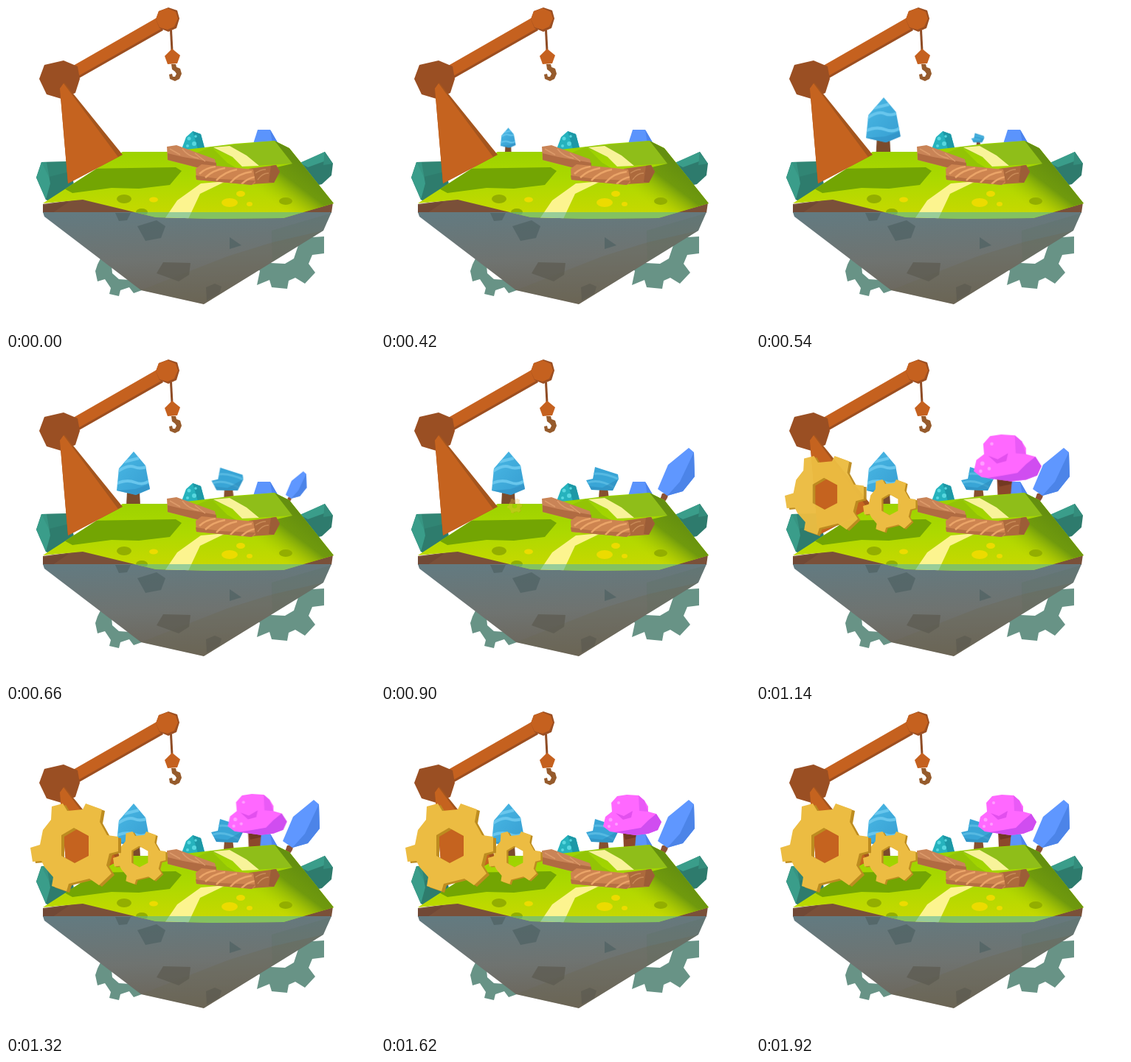
Animation of 500x440 px, one loop 1.98 s. Source, as an HTML page:

```html
<!DOCTYPE html>
<html lang="en">
<head>
<meta charset="utf-8">
<title>Floating island</title>
<style>
html, body { margin: 0; width: 100%; height: 100%; overflow: hidden; background: #fff; }
svg { display: block; width: 100vw; height: 100vh; }
.pop { animation: 1980ms step-end infinite; }
#pine { transform-origin: 172px 198px; animation-name: pine; }
#bent { transform-origin: 301px 189px; animation-name: bent; }
#leaf { transform-origin: 384px 196px; animation-name: leaf; }
#pink { transform-origin: 338px 185px; animation-name: pink; }
#cog { transform-origin: 181px 201px; animation-name: cog; }
#wheel { transform-origin: 93px 187px; animation-name: wheel; }
/* one 60 ms step is 3.03% of the loop */
@keyframes pine {
  0% { transform: scale(0); }
  21.2% { transform: scale(.46); }
  24.2% { transform: scale(.8); }
  27.2% { transform: scale(1.04); }
  30.3% { transform: scale(1.06); }
  33.3%, 100% { transform: none; }
}
@keyframes bent {
  0% { transform: scale(0); }
  27.2% { transform: scale(.4); }
  30.3% { transform: scale(.75); }
  33.3% { transform: scale(.98); }
  36.3% { transform: scale(1.05); }
  39.3% { transform: scale(1.02); }
  42.4%, 100% { transform: none; }
}
@keyframes leaf {
  0% { transform: scale(0); }
  30.3% { transform: scale(.25); }
  33.3% { transform: scale(.57); }
  36.3% { transform: scale(.85); }
  39.3% { transform: scale(1.04); }
  42.4% { transform: scale(1.03); }
  45.4%, 100% { transform: none; }
}
@keyframes pink {
  0% { transform: scale(0); }
  48.4% { transform: scale(.4); }
  51.5% { transform: scale(.8); }
  54.5% { transform: scale(1.08); }
  57.5% { transform: scale(1.16); }
  60.6% { transform: scale(1.11); }
  63.6% { transform: scale(1.05); }
  66.6% { transform: scale(1.015); }
  69.6%, 100% { transform: none; }
}
@keyframes cog {
  0% { transform: scale(0); opacity: 0; }
  45.4% { transform: scale(.28); opacity: .35; }
  48.4% { transform: scale(.55); opacity: .65; }
  51.5% { transform: scale(.8); opacity: .9; }
  54.5% { transform: scale(.95); opacity: 1; }
  57.5%, 100% { transform: none; opacity: 1; }
}
@keyframes wheel {
  0% { transform: scale(0); opacity: 0; }
  51.5% { transform: scale(.35); opacity: .4; }
  54.5% { transform: scale(.66); opacity: .75; }
  57.5% { transform: scale(.9); opacity: .97; }
  60.6% { transform: scale(.98); opacity: 1; }
  63.6%, 100% { transform: none; opacity: 1; }
}
</style>
</head>
<body>
<svg viewBox="0 0 500 440" preserveAspectRatio="none">
  <defs>
    <linearGradient id="grass" x1="0" y1="0" x2="0" y2="1">
      <stop offset="0" stop-color="#96cf00"/><stop offset=".5" stop-color="#acd900"/><stop offset="1" stop-color="#ccd800"/>
    </linearGradient>
    <linearGradient id="rock" x1=".3" y1="0" x2=".45" y2="1">
      <stop offset="0" stop-color="#637a80"/><stop offset=".5" stop-color="#6f7370"/><stop offset="1" stop-color="#6b6254"/>
    </linearGradient>
    <linearGradient id="slope" gradientUnits="userSpaceOnUse" x1="402" y1="215" x2="362" y2="268">
      <stop offset="0" stop-color="#648f10"/><stop offset=".4" stop-color="#709a0d"/><stop offset="1" stop-color="#b4d000" stop-opacity="0"/>
    </linearGradient>
    <linearGradient id="needle" x1="0" y1="0" x2="1" y2="1">
      <stop offset="0" stop-color="#4bbbe7"/><stop offset="1" stop-color="#359bcf"/>
    </linearGradient>
    <clipPath id="island"><path d="M50 280 52 286 183 386 268 405 430 305 441 280Z"/></clipPath>
    <clipPath id="turf"><path d="M50 268 158 198 218 198 278 191 310 187 364 183 384 193 444 268 376 288 280 289 203 287 104 263Z"/></clipPath>
    <clipPath id="crown"><path d="M173 127 189 146 195 178 176 186 150 180 153 150Z"/></clipPath>
    <clipPath id="cap"><path d="M290 148 321 158 322 164 314 180 285 179 278 166 287 164Z"/></clipPath>
    <clipPath id="logs"><path d="M218 191 231 189 283 208 285 217 262 220 219 209ZM257 221 265 215 335 222 338 240 333 243 258 236Z"/></clipPath>
    <path id="tooth" fill-rule="evenodd" d="M62 131 77 127 83 137 104 135 108 127 130 135 127 152 137 170 152 172 152 192 140 195 136 211 143 222 126 238 113 229 85 236 82 246 62 239 64 227 52 213 48 205 36 206 33 187 46 183 50 163 61 149ZM75 170 92 160 112 171 112 198 93 208 75 198Z"/>
    <g id="gear">
      <use href="#tooth" x="4" y="2" fill="#bd8c20"/>
      <use href="#tooth" fill="#ecbc42"/>
    </g>
  </defs>

  <!-- lower gears -->
  <g fill="#689386">
    <path fill-rule="evenodd" d="M128 343 124 351 121 360 124 374 134 371 142 383 140 391 153 394 155 386 167 382 173 390 184 386 160 345ZM143 352 144 363 153 371 168 372Z"/>
    <path fill-rule="evenodd" d="M399 315 431 313 431 336 415 338 410 350 419 362 405 377 392 369 383 373 381 384 360 382 357 372 340 379 344 360 338 350ZM359 340 359 349 378 350 390 343 396 325Z"/>
  </g>

  <!-- bushes and stones -->
  <path fill="#2e7c6d" d="M41 233 48 212 86 211 95 258 62 267 54 263Z"/>
  <path fill="#3a9d8a" d="M41 233 48 212 55 212 60 241 54 263Z"/>
  <path fill="#348e7c" d="M48 212 86 211 86 225 58 232Z" opacity=".5"/>
  <path fill="#2e7b6d" d="M394 216 432 198 443 214 441 230 428 242 415 245Z"/>
  <path fill="#3a9d8a" d="M398 213 432 198 431 211 409 219Z"/>
  <path fill="#348d7c" d="M432 198 443 214 430 216Z"/>

  <g id="pine" class="pop">
    <path fill="#7b4b2c" d="M164 182H181L182 200H163Z"/>
    <g clip-path="url(#crown)">
      <path fill="url(#needle)" d="M145 120H200V190H145Z"/>
      <path fill="none" stroke="#68c6ed" stroke-width="4" d="M150 155Q165 144 174 148T194 146M147 172Q162 164 175 169T197 164M160 141 180 136"/>
      <path fill="#308fc3" opacity=".55" d="M150 180 175 178 196 171 195 188 150 188Z"/>
    </g>
  </g>
  <g id="bent" class="pop">
    <path fill="#87502f" d="M296 176H307L309 191H295Z"/>
    <g clip-path="url(#cap)">
      <path fill="#39a5d6" d="M275 145H325V185H275Z"/>
      <path fill="none" stroke="#56b9e2" stroke-width="3" d="M284 158Q300 154 323 165M278 170Q295 163 316 176"/>
      <path fill="#2d8cbe" opacity=".6" d="M281 174 300 176 322 164 314 182H284Z"/>
    </g>
  </g>
  <path fill="#5b94fc" d="M335 187 341 168 358 168 369 187Z"/>
  <path fill="#4d83ec" d="M358 168 369 187 361 187Z"/>
  <g id="leaf" class="pop">
    <path fill="#8b5035" d="M381 184 390 183 388 190 383 198 377 195Z"/>
    <path fill="#5f97ff" d="M417 122 424 128 425 161 409 181 388 187 375 178 389 145Z"/>
    <path fill="#4c84e8" d="M424 128 425 161 409 181 388 187 405 168Z"/>
  </g>
  <g id="pink" class="pop">
    <path fill="#8c482b" d="M328 164H346L344 188H329Z"/>
    <path fill="#733922" d="M328 167H346L345 173 331 176Z"/>
    <path fill="#ff68ff" d="M320 117 333 115 349 116 357 123 362 131 362 138 373 141 380 152 375 163 362 168 345 170 310 165 301 158 304 145 313 138 312 126Z"/>
    <path fill="#d04df0" d="M335 163 352 160 362 150 373 141 380 152 375 163 362 168 345 170 316 166Z"/>
    <path fill="#e250ee" d="M318 140 329 144 341 137 339 146 328 149Z"/>
    <path fill="#e95af6" d="M349 116 357 123 362 138 350 137Z"/>
    <g fill="#ff9dff"><circle cx="322" cy="126" r="2"/><circle cx="311" cy="149" r="2.5"/><circle cx="319" cy="155" r="2"/><circle cx="309" cy="158" r="2"/></g>
  </g>
  <path fill="#26b2bd" d="M237 197 244 178 253 170 264 174 271 200Z"/>
  <path fill="#1d98a6" d="M253 170 264 174 271 200 261 198Z"/>
  <g fill="#58d7df"><circle cx="248" cy="180" r="2.5"/><circle cx="255" cy="187" r="3"/><circle cx="246" cy="190" r="2"/><circle cx="257" cy="177" r="1.8"/></g>

  <!-- soil and body -->
  <path fill="#7a5039" d="M50 269 104 262 203 286 376 287 443 267 441 281H50Z"/>
  <path fill="#684032" d="M50 271 85 266 63 281H50Z" opacity=".5"/>
  <g clip-path="url(#island)">
    <path fill="url(#rock)" d="M45 280H445V410H45Z"/>
    <path fill="#58705f" opacity=".25" d="M360 305 445 280 445 300 361 349Z"/>
    <path fill="#6c6755" opacity=".35" d="M183 386 300 340 361 321 430 305 268 405Z"/>
    <g fill="#4f6163" opacity=".7">
      <path d="M178 299 204 291 216 299 210 315 189 319Z"/>
      <path d="M303 314 319 325 303 330Z"/>
      <path d="M148 281H169L164 291 153 292Z"/>
    </g>
    <g fill="#5c5b50" opacity=".7">
      <path d="M204 363 213 348 250 349 248 365 234 374Z"/>
      <path d="M271 382 283 377 292 381 289 391 272 400Z"/>
    </g>
  </g>

  <!-- meadow -->
  <g clip-path="url(#turf)">
    <path fill="url(#grass)" d="M45 180H450V292H45Z"/>
    <path fill="#73a503" d="M77 247 108 221 230 219 238 224 222 243 180 248 143 247 90 254Z"/>
    <path fill="#93c405" d="M252 202 278 191 300 213 345 239 330 243Z"/>
    <path fill="#8fbe19" d="M278 192 364 183 388 214 336 217Z"/>
    <path fill="url(#slope)" d="M364 183 384 193 446 269 376 288 285 240 371 218 388 214Z"/>
    <path fill="#f8f39a" d="M281 192 303 190 326 203 343 217 320 218 307 205Z"/>
    <path fill="#fcf48f" d="M264 241 298 238 263 255 247 289 215 289 232 264Z"/>
    <g fill="#93ae00"><ellipse cx="160" cy="262" rx="10" ry="6"/><ellipse cx="184" cy="280" rx="8" ry="5"/><ellipse cx="379" cy="265" rx="9" ry="5"/></g>
    <g fill="#ecdb00"><ellipse cx="303" cy="267" rx="11" ry="6"/><ellipse cx="318" cy="255" rx="6" ry="4"/><ellipse cx="330" cy="269" rx="4" ry="3"/><ellipse cx="200" cy="263" rx="6" ry="3.5"/></g>
    <path fill="#57b5a1" opacity=".6" d="M50 280H441V292H50Z"/>
  </g>

  <!-- crane -->
  <path fill="#9c4e20" d="M94 85 206 20 213 33 99 98Z"/>
  <path fill="#c5611f" d="M92 80.500 206 15 212 30 98 95Z"/>
  <path fill="#9a4f23" d="M45 99 52 80 78 74 97 82 100 99 94 118 75 126 55 120Z"/>
  <path fill="#a4551e" d="M79 104 158 202 84 241 73 112Z"/>
  <path fill="#c5631f" d="M78 105 152 205 84 241 73 112Z"/>
  <path fill="#9c4f22" d="M203 18 207 7 220 2 232 6 235 17 231 30 220 35 208 30Z"/>
  <path fill="#c5611f" d="M203 18 207 7 219 3 230 8 233 17 228 28 219 32 208 29Z"/>
  <path fill="none" stroke="#8f4c25" stroke-width="3" d="M223.500 33 225 61"/>
  <path fill="#c5611f" d="M225 58 236 67 232 78 219 79 215 68Z"/>
  <path fill="#965b2c" d="M224 79H230L231 83 236 85 238 92 235 99 229 102 222 99 221 93 225 92 226 96 229 96 231 92 229 89 225 86Z"/>

  <!-- timber -->
  <path fill="#c98457" d="M218 191 231 189 283 208 285 217 262 220 219 209Z"/>
  <path fill="#b06b42" d="M219 200 240 205 285 213 285 217 262 220 219 209Z"/>
  <path fill="#ad6a3d" d="M329 221 366 216 371 225 363 240 333 242Z"/>
  <path fill="#9c5d37" d="M359 217 366 216 371 225 363 240 356 239Z"/>
  <path fill="#cd8450" d="M257 221 265 215 335 222 338 240 333 243 258 236Z"/>
  <path fill="#b56f43" d="M257 230 290 235 338 237 333 243 258 236Z"/>
  <g clip-path="url(#logs)" fill="none" stroke="#eaa468" stroke-width="2.500">
    <path stroke="#dc9a6a" stroke-width="1.500" d="M222 194 236 202M239 194Q246 204 261 207M256 200 270 211"/>
    <path d="M262 228Q270 220 284 218M270 233Q280 223 297 220M285 237Q296 225 313 222M304 240Q315 227 333 225M319 242Q327 234 338 232"/>
  </g>
  <path fill="none" stroke="#c98a58" stroke-width="1.500" d="M338 227Q345 222 352 222M341 236Q347 227 356 227"/>

  <!-- golden gears -->
  <g id="cog" class="pop"><use href="#gear" transform="translate(125.200 88.800) scale(.6)"/></g>
  <g id="wheel" class="pop"><use href="#gear"/></g>
</svg>
</body>
</html>
```
